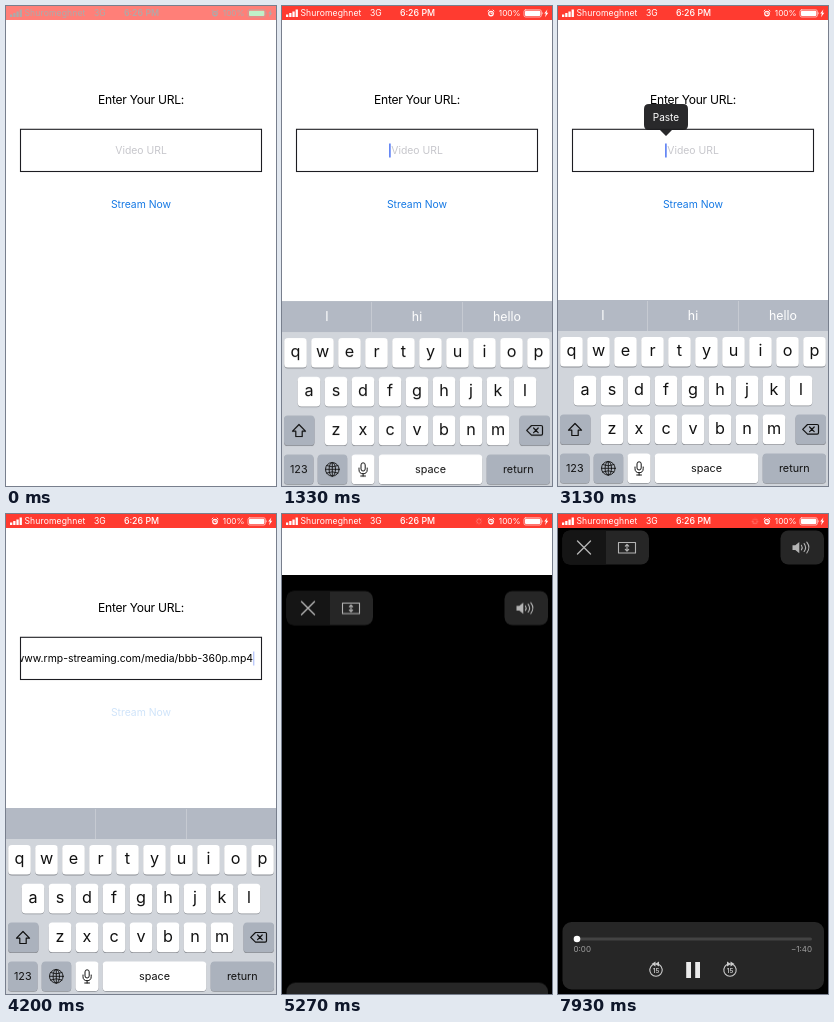
These frames come from a looping animation (270x480 px, 8000 ms). An HTML page:

```html
<!DOCTYPE html>
<html lang="en">
<head>
<meta charset="utf-8">
<title>Stream from URL</title>
<style>
html, body { margin: 0; width: 100%; height: 100%; overflow: hidden; background: #fff; }
svg { display: block; width: 100vw; height: 100vh; }
text { font-family: Inter, Roboto, sans-serif; }
.mid { text-anchor: middle; }
.end { text-anchor: end; }
.body { font-size: 10.4px; }
.line { fill: none; stroke: currentColor; stroke-linecap: round; stroke-linejoin: round; }

#bar, #keyboard, #hints, #hintCaret, #textCaret, #placeholder, #typed, #clipped, #button,
#loupe, #menu, #player, #network, .loading, .loaded, .play, .pause, .skip {
  animation: 8s linear infinite both;
}
.status { color: #fff; --battery: #fff; }
.status.dark { color: #111; --battery: #4cd964; }
#bar { animation-name: bar; }
@keyframes bar {
  0%, .86% { opacity: .65; }
  .88% { opacity: .8; }
  2.5%, 100% { opacity: 1; }
}
#keyboard { animation-name: keyboard; }
@keyframes keyboard {
  0%, 12.13% { transform: translateY(188px); animation-timing-function: ease; }
  17.13%, 55.6% { transform: none; animation-timing-function: ease; }
  60.6%, 100% { transform: translateY(188px); }
}
#hints { animation-name: hints; animation-timing-function: step-end; }
@keyframes hints { 0% { opacity: 1; } 41%, 100% { opacity: 0; } }
#hintCaret { animation-name: hintCaret; animation-timing-function: step-end; }
@keyframes hintCaret { 0% { opacity: 0; } 12.5% { opacity: 1; } 40%, 100% { opacity: 0; } }
#textCaret { animation-name: textCaret; }
@keyframes textCaret {
  0%, 39.99% { opacity: 0; }
  40%, 46.5% { opacity: 1; }
  49%, 51.8% { opacity: 0; }
  52.5% { opacity: .35; }
  53.5%, 55.5% { opacity: 1; }
  55.6%, 100% { opacity: 0; }
}
#placeholder { animation-name: placeholder; animation-timing-function: step-end; }
@keyframes placeholder { 0% { opacity: 1; } 40%, 100% { opacity: 0; } }
#typed { animation-name: typed; animation-timing-function: step-end; }
@keyframes typed { 0% { opacity: 0; } 40% { opacity: 1; } 55.6%, 100% { opacity: 0; } }
#clipped { animation-name: clipped; animation-timing-function: step-end; }
@keyframes clipped { 0% { opacity: 0; } 55.6%, 100% { opacity: 1; } }
#button { animation-name: button; }
@keyframes button {
  0%, 52.4% { opacity: 1; }
  52.5%, 54% { opacity: .2; }
  57%, 100% { opacity: 1; }
}
#loupe { animation-name: loupe; transform-origin: 158px 144px; }
@keyframes loupe {
  0%, 20% { transform: scale(0); animation-timing-function: ease-out; }
  22.5%, 31.6% { transform: none; animation-timing-function: ease-in; }
  33.3%, 100% { transform: scale(0); }
}
#menu { animation-name: menu; }
@keyframes menu {
  0%, 35.7% { opacity: 0; }
  37.2%, 39.4% { opacity: 1; }
  41.5%, 100% { opacity: 0; }
}
#player { animation-name: player; }
@keyframes player {
  0%, 62.24% { transform: translateY(480px); animation-timing-function: ease; }
  68.49%, 100% { transform: none; }
}
#network { animation-name: network; animation-timing-function: step-end; }
@keyframes network { 0% { opacity: 0; } 62.5%, 100% { opacity: .7; } }
.loading { animation-name: loading; animation-timing-function: step-end; }
@keyframes loading { 0% { opacity: 1; } 82.5%, 100% { opacity: 0; } }
.loaded { animation-name: loaded; animation-timing-function: step-end; }
@keyframes loaded { 0% { opacity: 0; } 82.5%, 100% { opacity: 1; } }
.play { animation-name: play; animation-timing-function: step-end; }
@keyframes play { 0% { opacity: 1; } 86.7%, 100% { opacity: 0; } }
.pause { animation-name: pause; animation-timing-function: step-end; }
@keyframes pause { 0% { opacity: 0; } 86.7%, 100% { opacity: 1; } }
.skip { animation-name: skip; animation-timing-function: step-end; }
@keyframes skip { 0% { opacity: .65; } 82.5%, 100% { opacity: 1; } }
.spokes { animation: spin 1s steps(8) infinite; }
@keyframes spin { to { transform: rotate(360deg); } }
</style>
</head>
<body>
<svg viewBox="0 0 270 480" preserveAspectRatio="none">
  <defs>
    <clipPath id="fieldClip"><rect x="15" y="124" width="240" height="41"/></clipPath>
    <clipPath id="loupeClip"><circle cx="158" cy="97" r="40.5"/></clipPath>
    <linearGradient id="glass" x2="0" y2="1">
      <stop offset="0" stop-color="#888" stop-opacity=".35"/>
      <stop offset=".4" stop-color="#aaa" stop-opacity=".1"/>
      <stop offset="1" stop-color="#aaa" stop-opacity="0"/>
    </linearGradient>
    <radialGradient id="rim">
      <stop offset=".84" stop-color="#777" stop-opacity="0"/>
      <stop offset="1" stop-color="#777" stop-opacity=".4"/>
    </radialGradient>
    <g id="status">
      <g fill="currentColor">
        <path d="M4 8.5h2.3V11H4zM7.2 7h2.3v4H7.2zM10.4 5.4h2.3V11h-2.3zM13.6 3.6h2.3V11h-2.3z"/>
        <g font-size="8.6">
          <text x="18.5" y="10.4" letter-spacing=".1">Shuromeghnet</text>
          <text x="88" y="10.4">3G</text>
          <text x="135.5" y="10.4" class="mid" font-weight="500" font-size="8.8">6:26 PM</text>
          <text x="238.5" y="10.4" class="end" font-size="8.2">100%</text>
        </g>
        <path d="M260.2 5.8q1.2 1.5 0 3zM265.4 3.4l-3.2 4.2h1.7l-.9 3.6 3.3-4.5h-1.8z"/>
      </g>
      <circle cx="209" cy="7.6" r="2.3" class="line" stroke-width="1.1"/>
      <path d="M206 5l1-1M212 5l-1-1M209 6.4v1.3h1" class="line" stroke-width=".9"/>
      <rect x="242" y="3.8" width="17.4" height="7.2" rx="1.7" class="line" stroke-width=".6"/>
      <rect x="243" y="4.8" width="15.4" height="5.2" rx=".9" fill="var(--battery)"/>
    </g>
    <g id="skipIcon" color="#ccc">
      <path d="M-3.4 -5.2A6.2 6.2 0 1 0 3.4 -5.2" class="line" stroke-width="1.1"/>
      <text class="mid" y="2.6" font-size="6.3" font-weight="600" fill="currentColor">15</text>
    </g>
  </defs>

  <rect width="270" height="480" fill="#fff"/>
  <text x="135" y="98" class="mid" font-size="12.1" letter-spacing="-.28">Enter Your URL:</text>
  <g id="field">
    <rect x="14.5" y="123.3" width="241" height="42.2" fill="#fff" stroke="#1d1d22" stroke-width="1.1"/>
    <text id="placeholder" x="135" y="148.4" class="mid body" fill="#c7c7cc">Video URL</text>
  </g>
  <g clip-path="url(#fieldClip)" class="body">
    <text id="typed" x="247" y="148.4" class="end">https://www.rmp-streaming.com/media/bbb-360p.mp4</text>
    <text id="clipped" x="135" y="148.4" class="mid">https://www.rmp-streaming.com/media/bbb-3...</text>
  </g>
  <rect id="hintCaret" x="107.2" y="137.5" width="1.4" height="14" fill="#426bf2"/>
  <rect id="textCaret" x="247" y="137.5" width="1.4" height="14" fill="#426bf2"/>
  <text id="button" x="135" y="202" class="mid body" fill="#1679e4">Stream Now</text>

  <g id="keyboard">
    <rect y="294" width="270" height="188" fill="#d1d5db"/>
    <rect y="294" width="270" height="31" fill="#b3b9c4"/>
    <path d="M89.5 295v30M180.5 295v30" stroke="#c6cad2"/>
    <g id="hints" class="mid" font-size="12.4" fill="#fff">
      <text x="45" y="314">I</text><text x="135" y="314">hi</text><text x="225" y="314">hello</text>
    </g>
    <g id="keys"></g>
    <g color="#111">
      <path d="M17 417.5l6.5 6.7h-3.3v5.3h-6.4v-5.3h-3.3z" class="line" stroke-width="1.2"/>
      <path d="M249.5 418.5h9.7q1.3 0 1.3 1.3v7q0 1.3-1.3 1.3h-9.7l-4.8-4.8zM251.6 421l4.6 4.6m0-4.6l-4.6 4.6" class="line" stroke-width="1.2"/>
      <g class="line" stroke-width=".9">
        <circle cx="50.3" cy="462.3" r="6.8"/>
        <ellipse cx="50.3" cy="462.3" rx="3.2" ry="6.8"/>
        <path d="M43.5 462.3h13.6M50.3 455.5v13.6M44.6 458.6q5.7 2.6 11.4 0M44.6 466q5.7-2.6 11.4 0"/>
      </g>
      <rect x="79" y="455.8" width="4.2" height="8.2" rx="2.1" fill="none" stroke="#111"/>
      <path d="M77 461v1.6a4.1 4.1 0 0 0 8.2 0V461M81.1 466.7v2.3M78.7 469h4.8" class="line" stroke-width="1"/>
    </g>
  </g>

  <g id="menu">
    <path d="M91 98h34q5 0 5 5v16q0 5-5 5h-11l-6 6-6-6H91q-5 0-5-5v-16q0-5 5-5z" fill="#1c1c1e" fill-opacity=".94"/>
    <text x="108" y="114.5" class="mid" font-size="10" fill="#fff">Paste</text>
  </g>

  <g id="loupe">
    <circle cx="158" cy="97" r="41.6" fill="#777" opacity=".3"/>
    <circle cx="158" cy="97" r="40.5" fill="#fff"/>
    <g clip-path="url(#loupeClip)">
      <use href="#field" transform="translate(158 102.4) scale(1.2) translate(-158.5 -144.5)"/>
      <circle cx="158" cy="97" r="40.5" fill="url(#glass)"/>
      <circle cx="158" cy="97" r="40.5" fill="url(#rim)"/>
    </g>
    <circle cx="158" cy="97" r="40.8" fill="none" stroke="#a8a8aa" stroke-width=".8"/>
  </g>

  <g id="player">
    <rect width="270" height="482"/>
    <g fill="#262626">
      <rect x="4.5" y="16.5" width="86.5" height="34" rx="8"/>
      <rect x="222.5" y="16.5" width="43.5" height="34" rx="8"/>
      <rect x="4.5" y="408" width="261.5" height="67.5" rx="9"/>
    </g>
    <path d="M12.5 16.5H48v34H12.5q-8 0-8-8v-18q0-8 8-8z" fill="#151515"/>
    <g color="#b4b4b4">
      <path d="M19.5 27l13 13m0-13l-13 13" class="line" stroke-width="1.4"/>
      <rect x="60.5" y="28.5" width="17" height="10.5" class="line" stroke-width="1.1"/>
      <path d="M69 31v5.5M67.3 32.2L69 30.4l1.7 1.8M67.3 35.4l1.7 1.8 1.7-1.8" class="line" stroke-width="1.1"/>
      <path d="M234.5 31.3h2.8l4-3.3v11.3l-4-3.3h-2.8z" fill="currentColor"/>
      <path d="M243.4 31.3q1.6 2.3 0 4.6M246.1 29.7q3 4 0 7.8M248.8 28.2q4.2 5.4 0 10.8" class="line" stroke-width="1.1"/>
    </g>
    <rect x="16" y="423.4" width="238" height="3.2" rx="1.6" fill="#434343"/>
    <g class="loading">
      <circle cx="17.7" cy="425" r="1.9" fill="#888"/>
      <g transform="translate(20.8 435.6)"><g class="spokes" data-count="8" data-inner="2.2" data-outer="5" stroke="#fff"></g></g>
      <text x="254" y="438.3" class="end" font-size="8" fill="#8c8c8c">−−:−−</text>
    </g>
    <g class="loaded" font-size="8" fill="#a0a0a0">
      <circle cx="19" cy="425" r="3.3" fill="#fff"/>
      <text x="15.5" y="438.3">0:00</text>
      <text x="254" y="438.3" class="end">−1:40</text>
    </g>
    <g class="skip">
      <use href="#skipIcon" x="98" y="456"/>
      <use href="#skipIcon" x="172" y="456"/>
      <g fill="#ccc">
        <path d="M97.5 447.5v5l-4-2.5zM101 447.5v5l-4-2.5z"/>
        <path d="M172.5 447.5v5l4-2.5zM169 447.5v5l4-2.5z"/>
      </g>
    </g>
    <path class="play" d="M128 447.5l15 8.5-15 8.5z" fill="#8c8c8c"/>
    <path class="pause" d="M128.2 448h4.8v16h-4.8zM137.2 448h4.8v16h-4.8z" fill="#ececec"/>
  </g>

  <rect width="270" height="14" fill="#fff"/>
  <use href="#status" class="status dark"/>
  <g id="bar">
    <rect width="270" height="14" fill="#ff3b30"/>
    <use href="#status" class="status"/>
  </g>
  <g id="network" transform="translate(197 7.3)"><g class="spokes" data-count="8" data-inner="1.6" data-outer="3.1" stroke="#fff" stroke-width=".7"></g></g>
</svg>
<script>
const ns = 'http://www.w3.org/2000/svg';

function add(parent, tag, attrs, content = '') {
  const node = document.createElementNS(ns, tag);
  for (const [name, value] of Object.entries(attrs)) node.setAttribute(name, value);
  node.textContent = content;
  parent.append(node);
}

const keys = document.getElementById('keys');
const rowY = row => 345.8 + row * 38.8;

function key(left, width, row, label = '', { fill = '#fff', size = 10.8 } = {}) {
  const y = rowY(row);
  const box = { x: left, width, height: 29.6, rx: 3.6 };
  add(keys, 'rect', { ...box, y: y - 14, fill: '#8b8e94' });
  add(keys, 'rect', { ...box, y: y - 14.8, fill });
  const baseline = y + (size > 12 ? 4.6 : 3.7);
  add(keys, 'text', { x: left + width / 2, y: baseline, class: 'mid', 'font-size': size, fill: '#111' }, label);
}

[['qwertyuiop', 13.5], ['asdfghjkl', 27], ['zxcvbnm', 54]].forEach(([letters, start], row) =>
  [...letters].forEach((letter, i) => key(start + i * 27 - 11.3, 22.6, row, letter, { size: 16.2 })));

const gray = { fill: '#abb2bd' };
key(2, 30.5, 2, '', gray);
key(237.5, 30.5, 2, '', gray);
key(2, 29.5, 3, '123', gray);
key(35.7, 29.5, 3, '', gray);
key(69.5, 23, 3);
key(96.7, 103.6, 3, 'space');
key(204.7, 63.3, 3, 'return', gray);

for (const group of document.querySelectorAll('.spokes')) {
  const { count, inner, outer } = group.dataset;
  for (let i = 0; i < count; i++) {
    add(group, 'line', {
      y1: -inner, y2: -outer,
      transform: `rotate(${i * 360 / count})`,
      opacity: 0.4 + 0.6 * (i + 1) / count,
    });
  }
}
</script>
</body>
</html>
```
